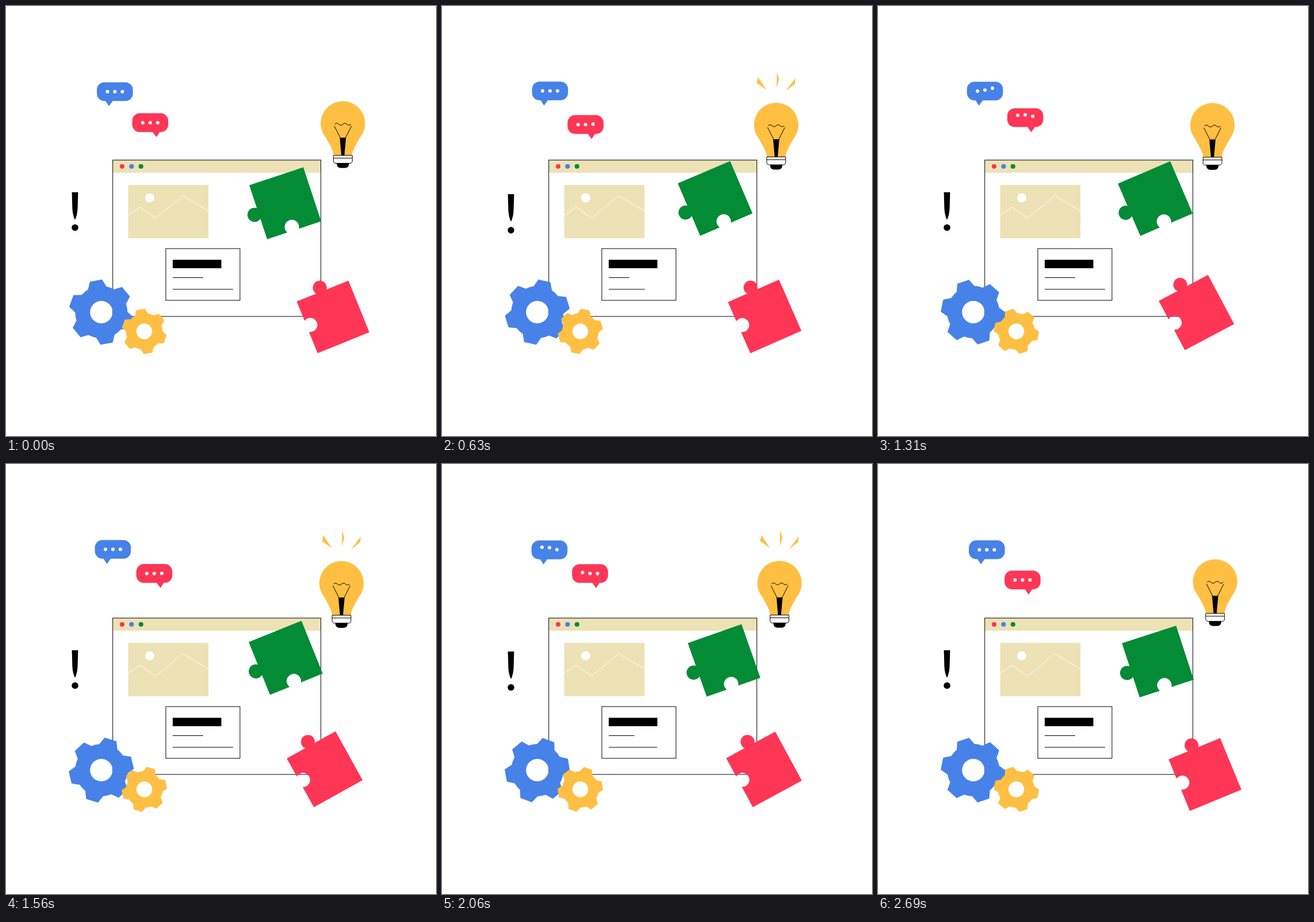
Write an HTML page that moves like this. It is 748 px wide and 748 px high and loops after 2.75 s.

```html
<!DOCTYPE html>
<html lang="en">
<head>
<meta charset="utf-8">
<title>Ideas at work</title>
<style>
html, body { margin: 0; width: 100%; height: 100%; overflow: hidden; background: #fff; }
svg { display: block; width: 100vw; height: 100vh; }
.blue { fill: #4782e9; }
.pink { fill: #ff3656; }
.gold { fill: #ffbf43; }
.green { fill: #048b36; }
.sand { fill: #ede2b5; }
.white { fill: #fff; }
.line { fill: none; stroke: #000; stroke-width: 1; }
</style>
</head>
<body>
<svg viewBox="0 0 748 748">
  <defs>
    <path id="gear" fill-rule="evenodd"/>
    <g id="piece">
      <path d="M-49.5-49.5H49.5V49.5H8.5A12.5 12.5 0 1 0-12.5 49.5H-49.5Z"/>
      <circle cx="-57" cy="2.4" r="12.3"/>
    </g>
    <rect id="bubble" x="-31.3" y="-16.3" width="62.6" height="32.6" rx="13"/>
  </defs>

  <!-- browser window -->
  <rect class="sand" x="185.7" y="268" width="362.4" height="22"/>
  <rect class="line" x="185.7" y="268" width="362" height="272"/>
  <circle class="pink" cx="202" cy="279" r="4.1"/>
  <circle class="blue" cx="218.4" cy="279" r="4.1"/>
  <circle class="green" cx="234.8" cy="279" r="4.1"/>

  <!-- picture placeholder -->
  <rect class="sand" x="212.5" y="311.3" width="139.7" height="92.7"/>
  <circle class="white" cx="250" cy="333.7" r="8"/>
  <path d="M212.5 364.5L233 350L260.5 369L307.5 330L352.2 356.5" fill="none" stroke="#fff"/>

  <!-- text card -->
  <rect class="line" x="278" y="422" width="129" height="90"/>
  <rect x="290" y="441.5" width="84.6" height="14.6"/>
  <path class="line" id="row1"/>
  <path class="line" id="row2"/>

  <!-- exclamation mark -->
  <path id="bar" d="M114.6 324H125.4L124.6 352Q124 364 120 372Q116 364 115.4 352Z"/>
  <circle id="dot" cx="120" cy="385.4" r="5.7"/>

  <g id="blueChat">
    <use href="#bubble" class="blue"/>
    <path class="blue" d="M-16.7 15.8L-10.4 25.2L-3.4 15.8Z"/>
  </g>
  <g id="pinkChat">
    <use href="#bubble" class="pink"/>
    <path class="pink" d="M3.6 15.8L10.6 25.2L16.9 15.8Z"/>
  </g>

  <g id="bulb">
    <path class="gold" d="M-16 56C-17 46-23 37.5-29.5 25A38.6 38.6 0 1 1 29.5 25C23 37.5 17 46 16 56Z"/>
    <path class="line" d="M-14 1.6q3.5-3.4 7 0t7 0t7 0t7 0M-15 4.5L-4.6 25M15 4.5L4.6 25"/>
    <path d="M-5.4 25H5.4L2.6 56H-2.6Z"/>
    <path d="M-10.6 69H10.6V71Q10 77.7 3.5 77.7H-3.5Q-10 77.7-10.6 71Z"/>
    <path d="M-16.4 55.8H16.4V65Q16.4 69.5 12 69.5H-12Q-16.4 69.5-16.4 65Z" fill="#fff" stroke="#000"/>
    <path class="line" d="M-16.4 60.6H16.4"/>
    <path class="gold" id="rays" d="M-31.4-83L-17-61L-34-73ZM1.3-92L4.8-79L.6-64ZM33.5-81L32.6-71.5L16.5-58.6Z"/>
  </g>

  <use href="#gear" id="bigGear" class="blue"/>
  <use href="#gear" id="smallGear" class="gold"/>
  <use href="#piece" id="greenPiece" class="green"/>
  <use href="#piece" id="pinkPiece" class="pink"/>
</svg>
<script>
const LOOP = 2750, HALF = LOOP / 2, THIRD = LOOP / 3, SIXTH = LOOP / 6;
const STEP = LOOP / 44;
const RAD = Math.PI / 180;
const $ = id => document.getElementById(id);
const place = (id, x, y, rest = '') => $(id).setAttribute('transform', `translate(${x} ${y}) ${rest}`);

function gearPath() {
  const at = (r, deg) => `${(r * Math.cos(deg * RAD)).toFixed(2)} ${(r * Math.sin(deg * RAD)).toFixed(2)}`;
  let d = '';
  for (let a = 0; a < 360; a += 60) {
    d += `${a ? 'L' : 'M'}${at(45.5, a - 21)}L${at(56.7, a - 10.9)}L${at(56.7, a + 10.9)}`
       + `L${at(45.5, a + 21)}A45.5 45.5 0 0 1 ${at(45.5, a + 39)}`;
  }
  return d + 'ZM19.6 0A19.6 19.6 0 1 0-19.6 0A19.6 19.6 0 1 0 19.6 0Z';
}

function addDots(id) {
  return [-13, 0, 13].map(x => {
    const c = document.createElementNS('http://www.w3.org/2000/svg', 'circle');
    c.setAttribute('class', 'white');
    c.setAttribute('cx', x);
    c.setAttribute('r', 3);
    $(id).append(c);
    return c;
  });
}

$('gear').setAttribute('d', gearPath());
const blueDots = addDots('blueChat'), pinkDots = addDots('pinkChat');

// Dots hop one after another, once per third of the loop.
function hopDots(dots, t, first, gap) {
  dots.forEach((c, i) => {
    const d = Math.min(1, Math.abs(t % THIRD - first - gap * i) / 180);
    c.setAttribute('cy', -2.5 * (1 + Math.cos(Math.PI * d)));
  });
}

// Damped bounce of the exclamation mark.
function bounce(p) {
  const u = (p - 260) / 540;
  return u < 0 || u > 1 ? 0 : -16 * (1 - u) * Math.sin(2 * Math.PI * u);
}

// A text row shrinks away, then is quickly written again.
function written(p) {
  if (p < 230) return 1;
  return p < 525 ? 1 - ((p - 230) / 295) ** 2.6 : 1 - Math.exp((525 - p) / 88);
}

function draw(t) {
  const turn = 360 * t / LOOP, p = t % HALF;
  // One slow swing per loop, cresting at angle peak; skew adds a faster one.
  const sway = (mid, amp, peak, skew = 0) =>
    mid + amp * Math.cos((turn - peak) * RAD) + skew * Math.cos(2 * turn * RAD);

  place('blueChat', sway(187.5, 1.75, 12, .2), sway(148.55, 1, 300));
  place('pinkChat', sway(253.8, 4.7, 232), sway(198, 9, 57));
  hopDots(blueDots, t, 200, 87);
  hopDots(pinkDots, t, 340, 75);

  place('bulb', sway(584.1, 3.6, 302), sway(206.3, 1.55, 180, -.65));
  const blink = t % SIXTH;
  $('rays').setAttribute('visibility', blink > 155 && blink < 384 ? 'visible' : 'hidden');

  place('greenPiece', sway(483.7, 8, 278, .9), sway(338.6, 5.4, 315, .7),
    `rotate(${sway(-21, 3.1, 318, .4)})`);
  place('pinkPiece', sway(560.8, 7.5, 0, .6), sway(536, 5.8, 45, .7),
    `rotate(${90 + sway(-25.7, 3.8, 35, .6)}) scale(.98)`);

  const spin = 20.4 + turn + 2.4 * Math.sin(2 * turn * RAD);
  place('bigGear', 165.8, 532.5, `rotate(${spin})`);
  place('smallGear', 240.6, 566, `rotate(${spin}) scale(.698)`);

  place('bar', 0, .68 * bounce(p));
  place('dot', 0, bounce(p));
  $('row1').setAttribute('d', `M290 472.5h${53 * written(p)}`);
  $('row2').setAttribute('d', `M290 492.8h${105 * written(p - 20)}`);
}

// The motion advances in 44 even steps per loop.
const start = performance.now();
function tick() {
  const t = (performance.now() - start) % LOOP;
  draw(Math.floor(t / STEP + .05) % 44 * STEP);
  requestAnimationFrame(tick);
}
tick();
</script>
</body>
</html>
```
